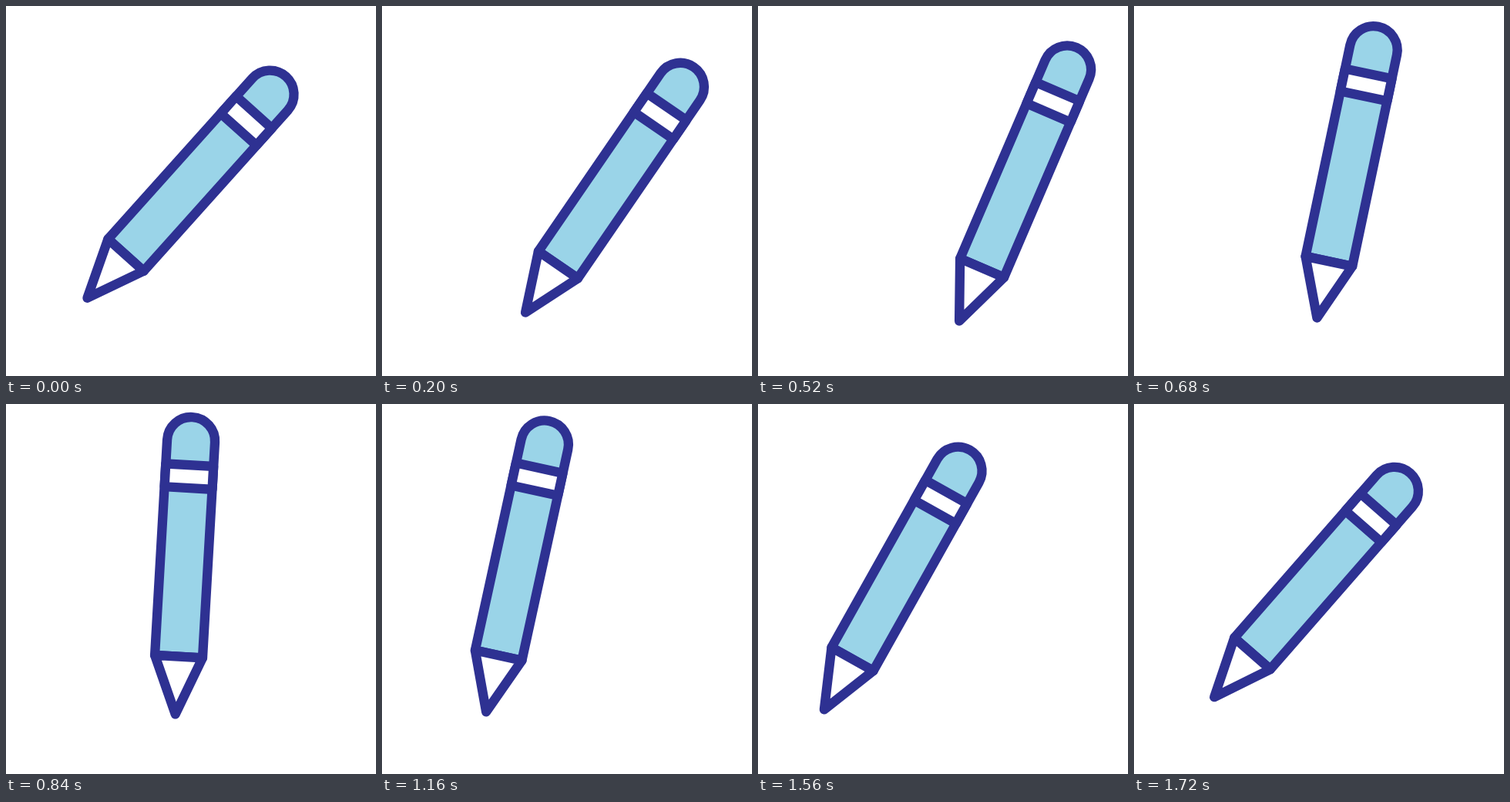
An HTML page for the animation above (1.76 s loop, 480x480 px).

```html
<!DOCTYPE html>
<html lang="en">
<head>
<meta charset="utf-8">
<title>Pencil</title>
<style>
  html, body { margin: 0; width: 100%; height: 100%; overflow: hidden; background: #fff; }
  svg { display: block; width: 100%; height: 100%; }
</style>
</head>
<body>
<svg viewBox="0 0 480 480">
  <g id="pencil" fill="#9ad4e8" stroke="#2e3192" stroke-width="12.3" stroke-linejoin="round">
    <path d="M-31 102.6V-177.5A31 31 0 0 1 31 -177.5V102.6Z"/>
    <path d="M-31 -146.2H31V-116.4H-31Z" fill="#fff"/>
    <path d="M-31 102.6H31L0 177.5Z" fill="#fff"/>
  </g>
</svg>
<script>
const LOOP = 1760, STEP = 40;
const pencil = document.getElementById('pencil');

// Poses of the pencil's middle; leave and arrive are the path tangents there.
const poses = [
  { time: 0,    x: 224,   y: 246.7, angle: 41.9, leave: [125, -3],    arrive: [91.5, 5] },
  { time: 400,  x: 349,   y: 252.7, angle: 27,   leave: [-112, -50],  arrive: [125, -15] },
  { time: 880,  x: 227.5, y: 225,   angle: 2.8,  leave: [-95, -10],   arrive: [-121.5, -10] },
  { time: 1390, x: 132.5, y: 234.2, angle: 19.4, leave: [91.5, 20],   arrive: [-95, 26] }
];
poses.push({ ...poses[0], time: LOOP });

const ease = u => u * u * (3 - 2 * u);
const mix = (a, b, s) => a + (b - a) * s;
const hermite = (a, b, leave, arrive, s) =>
  mix(a, b, ease(s)) + leave * s * (1 - s) ** 2 - arrive * s * s * (1 - s);

function draw(time) {
  const i = poses.findIndex(pose => pose.time > time);
  const a = poses[i - 1], b = poses[i];
  const s = ease((time - a.time) / (b.time - a.time));
  const x = hermite(a.x, b.x, a.leave[0], b.arrive[0], s);
  const y = hermite(a.y, b.y, a.leave[1], b.arrive[1], s);
  pencil.setAttribute('transform', `translate(${x} ${y}) rotate(${mix(a.angle, b.angle, s)})`);
}

const start = performance.now();
function tick() {
  const time = (performance.now() - start) % LOOP;
  draw(Math.floor(time / STEP) * STEP);
  requestAnimationFrame(tick);
}
tick();
</script>
</body>
</html>
```
